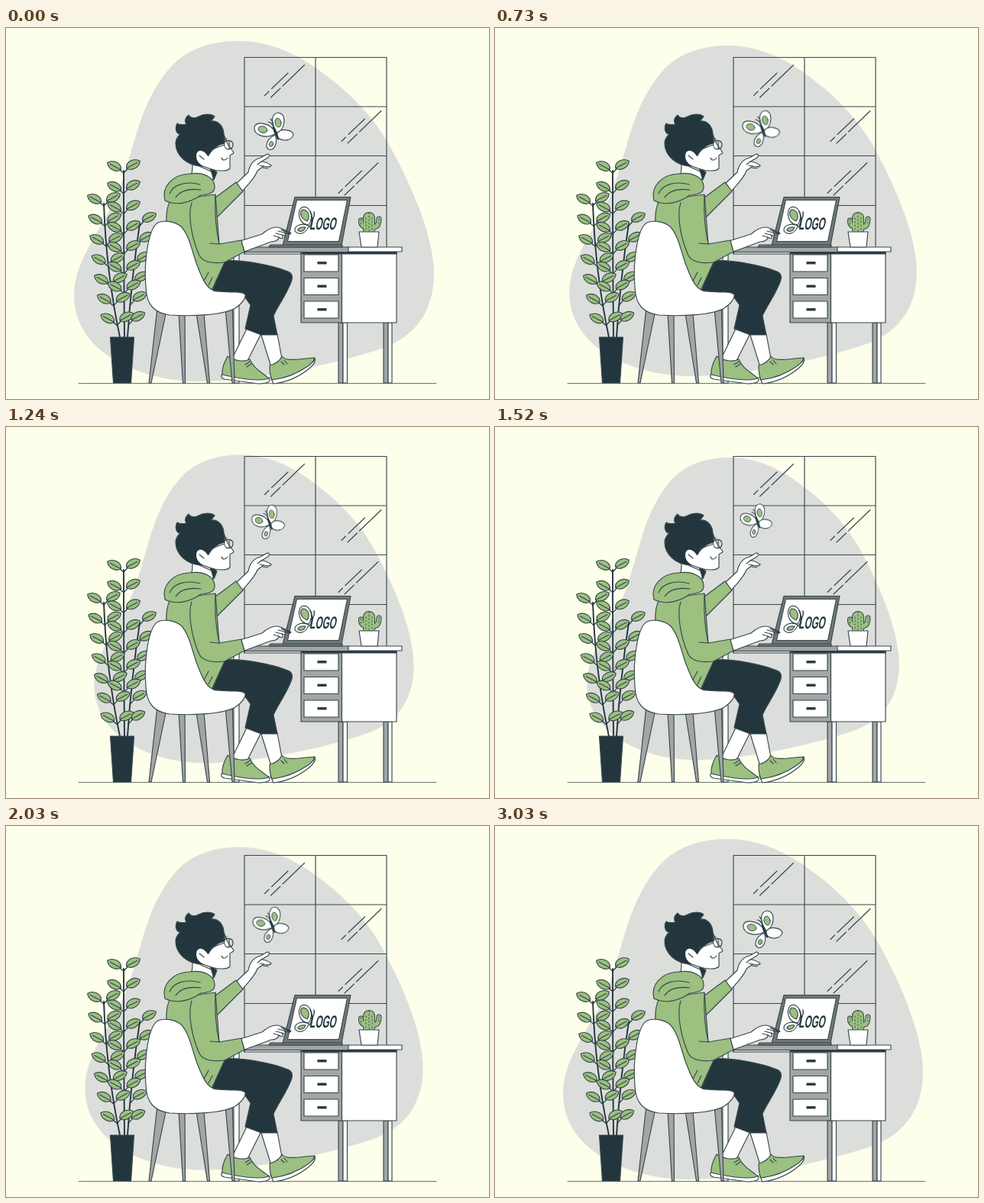
These frames come from a looping animation (632x486 px, 3.06 s). An HTML page:

```html
<!DOCTYPE html>
<html lang="en">
<head>
<meta charset="utf-8">
<title>Designer at a desk</title>
<style>
html, body { margin: 0; width: 632px; height: 486px; overflow: hidden; background: #fdffeb; }
svg {
  display: block; fill: none; stroke: #37474c; stroke-width: 1.15;
  stroke-linecap: round; stroke-linejoin: round;
}
.white { fill: #fff; }
.green { fill: #9bc080; }
.gray { fill: #a3a6a5; }
.dark { fill: #24363d; }
.steel { fill: #717877; }
text { font: 700 22.5px "Liberation Sans", Arial, sans-serif; fill: #24363d; stroke: none; }
</style>
</head>
<body>
<svg width="632" height="486" viewBox="0 0 632 486">
  <path id="blob" fill="#dcdedc" stroke="none" d="M304 17C340 17 374 30 405 52C448 82 480 115 502 154C525 196 560 268 560 322C560 376 530 406 494 419C440 438 330 463 252 463C180 463 89 428 89 350C89 300 132 258 150 206C170 148 176 98 213 54C234 29 266 17 304 17Z"/>

  <g id="window">
    <path d="M498 290V38.500H312V296M405 38.500V290M312 103H498M312 167.500H498M312 232.500H498"/>
    <path id="glint" d="M338.500 88.500L344 83M347.500 79.500L369 59M346.500 91L359 79M362 76L390.500 48.500"/>
    <use href="#glint" x="100.500" y="60"/>
    <use href="#glint" x="96.500" y="128"/>
  </g>

  <path stroke-opacity=".75" stroke-width="1" d="M95 465.500H563"/>

  <g id="desk">
    <path class="white" d="M298 294H305V465H298Z"/>
    <path class="gray" d="M435 386H441V465H435ZM494 386H500V465H494Z"/>
    <path class="white" d="M441 386H446.500V465H441ZM500 386H505V465H500Z"/>
    <path class="gray" d="M386 294H439.500V386H386Z"/>
    <path class="white" d="M439.500 294H511V386H439.500Z"/>
    <path class="dark" d="M387 293H511V296H387Z"/>
    <path d="M312 288V296H386"/>
    <path class="gray" d="M312 287H449V293.500H312Z"/>
    <path class="white" d="M448 287H518V293H448Z"/>
    <g id="drawers"></g>
  </g>

  <g id="cactus">
    <g id="cactus-body">
      <path stroke-width="16" d="M475 249V264"/>
      <path stroke-width="7" d="M464.500 252Q464 260 471 260M488 250Q488 261 480 261"/>
    </g>
    <g stroke="#9bc080">
      <path stroke-width="14" d="M475 249V264"/>
      <path stroke-width="5" d="M464.500 252Q464 260 471 260M488 250Q488 261 480 261"/>
    </g>
    <path stroke-width=".9" stroke-dasharray="1.500 3" d="M471 264V246M475 242V266M479 264V246M464.500 251V258M488 250V258"/>
    <path class="white" d="M462 267H488L486 287H465Z"/>
  </g>

  <g id="laptop">
    <path class="steel" d="M378 221.500H451L439 285H362Z"/>
    <path class="white" d="M380.500 225.500H446.500L435.500 279.500H368.500Z"/>
    <path class="steel" d="M346 284H440V287H344Z"/>
    <g transform="translate(390 250)">
      <path class="white" d="M6 8C-7 7 -10 -10 -3 -15C7 -19 14 -3 6 8ZM6 9C-2 5 -13 8 -12 16C-6 23 4 18 6 9Z"/>
      <path class="green" d="M4 3C-4 0 -7 -8 -2 -12C5 -12 9 -4 4 3ZM2 11C-3 10 -8 12 -8 15C-4 18 0 16 2 11Z"/>
      <path stroke-width="1.500" d="M7 11C12 4 11 -5 8 -10M9 2C13 -1 14 -5 13 -9"/>
    </g>
    <text transform="matrix(.52 0 -.2 1 397 264)">LOGO</text>
  </g>

  <g id="plant">
    <g id="stems" stroke="#24363d" stroke-width="1.900"></g>
    <g id="leaves" class="green"></g>
    <path class="dark" d="M136.500 405H167.500L163.500 465H140.500Z"/>
  </g>

  <g id="person">
    <path class="white" d="M333 399L355 401L361 433L347 444ZM315 394L334 400L313 442L296 433Z"/>
    <path class="white" d="M285 452L344 458C348 464 340 466 330 466L286 460C280 458 281 454 285 452ZM346 457C370 454 388 444 404 432C406 437 402 441 398 445C385 456 368 464 350 466Z"/>
    <path class="green" d="M290 430C299 436 311 438 319 434C324 447 337 452 344 459C330 464 300 458 283 454C282 445 286 437 290 430ZM345 442C353 440 358 437 361 430C367 438 386 433 403 432C405 436 399 440 395 443C381 453 365 459 348 461C345 455 345 449 345 442Z"/>
    <path d="M313 441L319 437M315 444L321 440M360 437L364 441M364 435L368 440"/>
    <path class="dark" d="M270 344L286 305C310 303 350 311 369 319C376 322 375 328 373 333C367 349 357 362 350 377L355 402L334 402L313 394L320 363L310 349Z"/>

    <path class="white" d="M302 203L317 189C319 178 325 172 333 170L342 165C346 165 345 169 341 171L334 175C340 175 343 177 347 180C346 183 341 182 337 181L329 187C326 196 317 205 309 214Z"/>
    <path d="M334 175L329 179M337 181L332 180M343 184L336 183"/>
    <path class="green" d="M262 231L301 202L310 214L275 249Z"/>

    <path class="white" d="M244 177C244 186 244 190 241 195L268 207L273 190Z"/>
    <path class="dark" d="M267 183L276 189L272 199Z"/>
    <path class="white" d="M264 134L284 137L290 152L298 163C297 166 294 165 293 167L293 184C288 189 274 187 266 184L252 179Z"/>
    <path class="dark" d="M257 181C236 181 222 166 222 151C222 146 225 142 228 139C222 139 221 130 224 125C227 127 231 127 236 126C233 121 235 117 239 114C241 118 247 119 252 116C259 112 269 112 273 116C271 119 270 120 268 122C279 121 285 130 285 140C287 145 286 149 286 151C278 153 270 158 265 167C260 169 262 176 257 181Z"/>
    <path class="white" stroke="none" d="M264 168C258 158 249 159 249 168C249 176 257 183 264 180Z"/>
    <path d="M253 167L259 172M267 160L286 153M282 170C283 174 287 174 290 170M284 147L289 145"/>
    <path d="M286 149C290 146 297 147 297 153C297 158 292 160 288 158C286 156 285 152 286 149ZM292 148V158"/>

    <path class="green" d="M215 226C207 240 209 265 216 285L243 326L269 344L286 307L312 293L308 278L279 283L274 218Z"/>
    <path d="M243 229C237 246 244 278 253 298C258 307 269 309 286 307M279 283L267 282M274 219C273 240 275 265 279 283M258 333L265 320M265 337L270 327"/>
    <path class="green" d="M208 226C203 208 218 192 240 191C259 188 272 196 273 207C274 216 266 218 255 219C242 228 224 234 208 226Z"/>
    <path d="M214 217C219 205 235 200 254 205M222 222C228 213 240 210 255 212"/>

    <path class="white" d="M308 278.500L335 270C343 263 351 259 359 262L372 268C373 271 369 270 364 268C367 272 365 273 361 271C364 276 361 277 357 274C357 278 352 280 347 280L312 293Z"/>
    <path d="M364 268L356 266M361 271L353 269M357 274L350 272"/>
    <path class="dark" d="M360 264L373 269L371 270Z"/>
  </g>

  <g id="chair">
    <path class="gray" d="M198 366L210 370L190 465H187ZM226 374H234L234.500 465H231.500ZM249 374H259L266.500 465H263.500ZM286 356H296L299 465H296Z"/>
    <path class="white" d="M200 254.500C187 259 180 303 183 340C184 363 194 373 214 376C244 378 285 376 300 367C307 362 314 355 313 349C309 345 301 346 293 346L276 345C262 344 256 326 249 308C243 290 239 270 229 260C220 253 208 252 200 254.500Z"/>
  </g>

  <g id="butterfly">
    <g class="white">
      <path d="M350 133C343 124 327 122 325 130C324 140 339 146 352 139Z"/>
      <path d="M352 140C356 149 352 160 345 159.500C338 157 340 146 352 140Z"/>
      <path d="M351 131C346 120 349 111 357 111C366 113 367 127 356 139Z"/>
      <path d="M355 138C360 130 374 134 376 139C375 147 363 150 355 143Z"/>
    </g>
    <g class="green" stroke-width=".9">
      <ellipse rx="6" ry="4.300" transform="translate(336 133) rotate(15)"/>
      <ellipse rx="4" ry="6" transform="translate(356 124) rotate(-12)"/>
      <ellipse rx="2.500" ry="3.500" transform="translate(347 152) rotate(20)"/>
    </g>
    <path stroke="#24363d" stroke-width="2.600" d="M350 130L356 145"/>
    <path d="M350 130C349 126 346 123 343 123M350 130C350 126 349 122 346 119"/>
  </g>
</svg>
<script>
const LOOP = 3060;
const byId = id => document.getElementById(id);

function add(parent, d, attrs = {}) {
  const path = document.createElementNS("http://www.w3.org/2000/svg", "path");
  path.setAttribute("d", d);
  for (const key in attrs) path.setAttribute(key, attrs[key]);
  byId(parent).append(path);
}

for (let i = 0; i < 3; i++) {
  const y = 297 + 30.5 * i;
  add("drawers", `M390 ${y}H435V${y + 22}H390Z`, { class: "white" });
  add("drawers", `M408 ${y + 9.5}H419V${y + 12}H408Z`, { class: "dark" });
}

// Leaves sit in pairs at even steps down a curved stem.
function growStem([x0, y0], [x1, y1], [x2, y2], pairs, sides) {
  add("stems", `M${x0} ${y0}Q${x1} ${y1} ${x2} ${y2}`);
  const along = (a, b, c, t) => (1 - t) ** 2 * a + 2 * t * (1 - t) * b + t * t * c;
  for (let i = 0; i < pairs; i++) {
    const t = 1 - i * 26 / (y0 - y2);
    const x = along(x0, x1, x2, t), y = along(y0, y1, y2, t);
    for (const side of sides) {
      const leafX = x + 12.5 * side, leafY = y - 7 - side;
      add("stems", `M${x} ${y + 3}L${leafX - 5 * side} ${leafY + 3}`, { "stroke-width": 1.2 });
      add("leaves", "M-10 0C-7 -8 5 -8 10 0C5 7 -6 7 -10 0M-10 0H6", {
        transform: `translate(${leafX} ${leafY}) scale(${side} 1) rotate(-28)`
      });
    }
  }
}
growStem([149, 405], [131, 320], [128, 230], 7, [-1, 1]);
growStem([159, 405], [164, 330], [175, 256], 6, [1]);
growStem([155, 405], [154, 300], [154, 187], 7, [-1, 1]);

// Rest, move away, come back, rest.
function play(id, easing, pose) {
  const frames = [[0, 0], [520, 0], [1540, 1], [2700, 0], [LOOP, 0]];
  byId(id).animate(
    frames.map(([t, p]) => ({ offset: t / LOOP, transform: pose(p), easing })),
    { duration: LOOP, iterations: Infinity }
  );
}

// Scale around (x, y) and carry that point to (toX, toY).
const place = (x, y, toX, toY, sx, sy) =>
  `translate(${toX}px, ${toY}px) scale(${sx}, ${sy}) translate(${-x}px, ${-y}px)`;

const settle = "cubic-bezier(.33, .4, .67, .95)";
play("blob", settle, p => place(324.5, 17, 324.5, 17 + 23 * p, 1 - .133 * p, 1 - .112 * p));
play("butterfly", settle, p =>
  place(350.5, 135.5, 350.5 - 8.8 * p, 135.5 - 12.8 * p, 1 - .19 * p, 1 - .1 * p));
</script>
</body>
</html>
```
